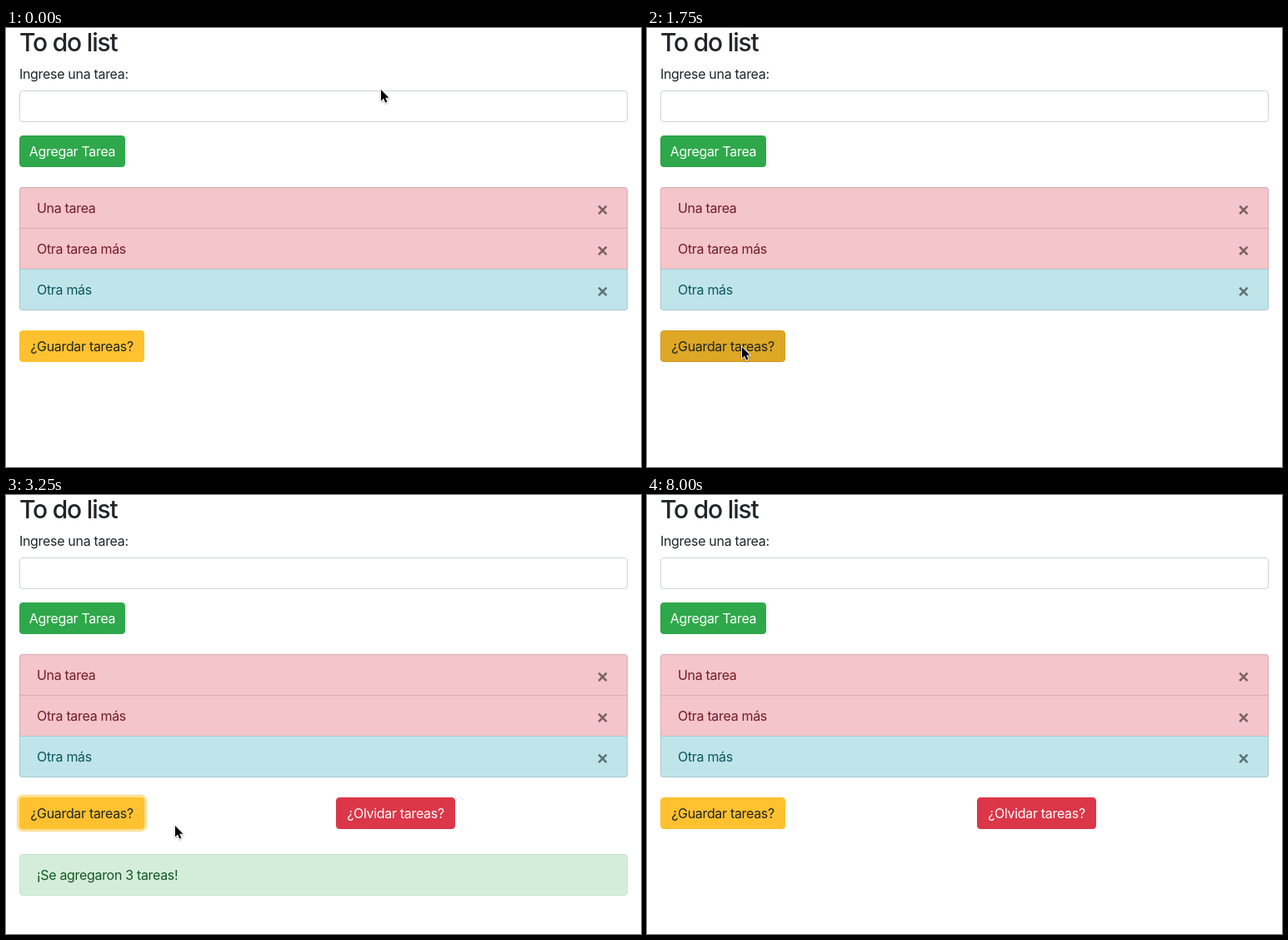
An HTML page for the animation above (8250 ms loop, 762 by 527 pixels).

```html
<!DOCTYPE html>
<html lang="es">
<head>
<meta charset="utf-8">
<title>To do list</title>
<style>
  html, body { margin: 0; width: 100%; height: 100%; overflow: hidden; background: #fff; }
  body { position: relative; font: 16px/24px Inter, "Liberation Sans", sans-serif; letter-spacing: -.02em; color: #212529; }
  body > * { position: absolute; box-sizing: border-box; margin: 0; white-space: nowrap; }
  h2 { left: 16px; top: -1px; font-size: 30px; line-height: 36px; font-weight: 500; letter-spacing: -1.2px; }
  label { left: 16px; top: 43px; }
  .field { left: 16px; top: 75px; width: 730px; height: 38px; border: 1px solid #ced4da; border-radius: 4px; }
  .button { height: 38px; line-height: 36px; border: 1px solid; border-radius: 4px; text-align: center; }
  .add { left: 16px; top: 129px; width: 127px; color: #fff; background: #2ea84a; border-color: #2ea84a; }
  .save { left: 16px; top: 363px; width: 150px; }
  .forget { left: 396px; top: 363px; width: 143px; color: #fff; background: #db3748; border-color: #db3748; }
  .row { left: 16px; width: 730px; height: 50px; padding: 12px 20px; border: 1px solid rgba(0, 0, 0, .125); }
  .danger { color: #721c24; background: #f4c5cb; }
  .info { color: #0c5460; background: #bfe5ea; }
  .row svg { position: absolute; right: 22px; top: 20px; opacity: .5; }
  .message { top: 431px; color: #155724; background: #d4edda; border-color: #c3e6cb; border-radius: 4px; }
  #cursor { left: -2px; top: -2px; filter: drop-shadow(0 1px 1px rgba(0, 0, 0, .3)); }
</style>
</head>
<body>
<h2>To do list</h2>
<label>Ingrese una tarea:</label>
<div class="field"></div>
<div class="button add">Agregar Tarea</div>
<div class="row danger" style="top:191px;border-radius:4px 4px 0 0">Una tarea</div>
<div class="row danger" style="top:240px;border-bottom:0;height:49px">Otra tarea más</div>
<div class="row info" style="top:289px;border-radius:0 0 4px 4px">Otra más</div>
<div class="button save" id="save">¿Guardar tareas?</div>
<div class="button forget" id="forget">¿Olvidar tareas?</div>
<div class="row message" id="message">¡Se agregaron 3 tareas!</div>
<svg id="cursor" width="16" height="22">
  <path transform="translate(2 2)" d="M0 0V13.5L3.1 10.6L5.2 15.6L7.4 14.7L5.3 9.7H9.5Z"
        stroke="#fff" stroke-width="1.6" paint-order="stroke"/>
</svg>
<script>
  const LOOP = 8250;
  const byId = id => document.getElementById(id);
  const save = byId('save'), forget = byId('forget'), message = byId('message'), cursor = byId('cursor');

  for (const row of document.querySelectorAll('.danger, .info'))
    row.insertAdjacentHTML('beforeend',
      '<svg width="14" height="13"><path d="M2.2 1.7L11.6 11.1M11.6 1.7L2.2 11.1" stroke="#000" stroke-width="2.6"/></svg>');

  // Each step: start time, then the value held until the next step.
  const pointer = [
    [0, 450, 74], [250, 421, 126], [750, 413, 132], [1000, 285, 248], [1250, 153, 358],
    [1500, 114, 382], [1750, 114, 383], [2750, 160, 386], [3000, 201, 398], [3250, 203, 397],
    [6750, 340, 238], [7000, 542, 2], [7250, -50, -50]
  ];
  const saveColors = [
    [0, '#ffc12f', '#ffc12f'], [1500, '#eeb42b', '#e8af29'],
    [1750, '#dea726', '#d19d22'], [3000, '#ffc12f', '#ffc12f']
  ];
  const stepAt = (steps, t) => steps.filter(step => step[0] <= t).pop();
  const show = (el, on) => el.style.visibility = on ? 'visible' : 'hidden';

  function draw(now) {
    const t = now % LOOP;
    const [, x, y] = stepAt(pointer, t);
    const [, fill, border] = stepAt(saveColors, t);
    cursor.style.transform = `translate(${x}px, ${y}px)`;
    save.style.background = fill;
    save.style.borderColor = border;
    save.style.boxShadow = t >= 2000 && t < 8000 ? '0 0 0 3.2px rgba(255, 193, 47, .5)' : 'none';
    show(forget, t >= 2000);
    show(message, t >= 2000 && t < 6000);
    requestAnimationFrame(draw);
  }
  draw(0);
</script>
</body>
</html>
```
